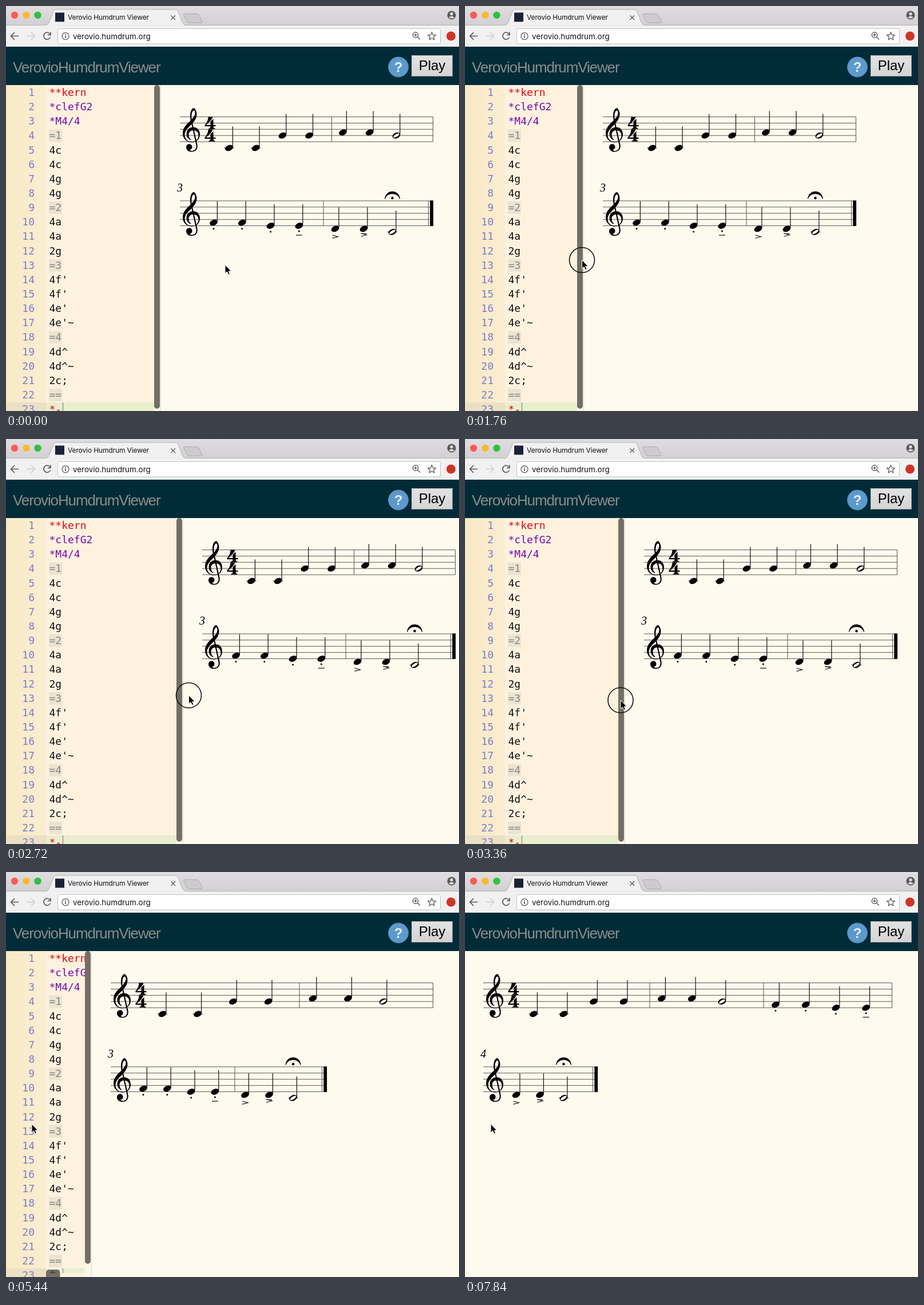
Recreate the animation shown at these times as an HTML page. Size 792 px wide and 707 px high, loop 8000 ms.

```html
<!DOCTYPE html>
<html lang="en">
<head>
<meta charset="utf-8">
<title>Verovio Humdrum Viewer</title>
<style>
  html, body { margin: 0; width: 100%; height: 100%; overflow: hidden; background: #fefaee; }
  svg { display: block; width: 792px; height: 707px; }
  text { white-space: pre; }
  .ui { font-family: Inter, "Open Sans", sans-serif; fill: #111; }
  .sans { font-family: "Liberation Sans", Arial, sans-serif; }
  .code { font: 18px "DejaVu Sans Mono", monospace; }
  .measure { font: italic 20px "Liberation Serif", "Noto Serif", serif; }
  .icon { fill: none; stroke: #5a5a5a; stroke-width: 1.7; }
</style>
</head>
<body>
<svg viewBox="0 0 792 707" xmlns="http://www.w3.org/2000/svg">
  <defs>
    <linearGradient id="titleBar" x2="0" y2="1">
      <stop stop-color="#dfdddf"/><stop offset="1" stop-color="#d2d0d2"/>
    </linearGradient>
    <linearGradient id="gutter">
      <stop stop-color="#f8e9c5"/><stop offset="1" stop-color="#fbeed2"/>
    </linearGradient>
    <linearGradient id="button" x2="0" y2="1">
      <stop stop-color="#e2e2e2"/><stop offset="1" stop-color="#d4d4d4"/>
    </linearGradient>
    <clipPath id="paneClip"><rect id="paneClipBox" y="138" height="569"/></clipPath>
    <path id="clef" d="M18.8 8C13 5.5 11.5 1 11.5-3C11.5-10 17-14.5 23.5-14.5C30.5-14.5 35-9 35-2C35 6.5 29 12 20.5 12C11.5 12 5 5.5 5-4C5-13 11-19 17.5-25C22-29.5 26.5-34 26.5-39.5C26.5-42 25.8-43.5 24.5-43.5C21.5-43.5 19.8-37 20.5-29L30.5 16C32 24 27 28.5 20.5 28.5C15 28.5 11 25 11 20.5C11 17 13.5 14.8 16.3 14.8C19.3 14.8 21.5 17 21.5 20C21.5 22.5 20 24.5 17.5 25C18.5 26.7 20.5 27 22 26.8C27 26 29.3 22 28.5 17L18.8-27C17-35 18-47 25-48C28-45 29.5-41 29.5-37C29.5-29.5 24.5-23.5 19.5-18.5C13.5-12.5 8.5-8 8.5-1C8.5 6.5 14 11 20.8 11C28.5 11 32.5 6 32.5 0C32.5-5 29-9 24-9C18.5-9 15.5-5.5 15.5-1.5C15.5 3 17 5.5 19.5 7Z"/>
    <path id="four" d="M6 0H14C12 6 6 11 2 14.3H10V8L15 3.5V14.3H19V16.5H15C15 19 16 20 18 20V21.3H7V20C9 20 10 19 10 16.5H0V14.3C4 10 6 5 6 0Z"/>
  </defs>

  <rect width="792" height="707" fill="#fefaee"/>
  <g id="score"></g>

  <g id="pane">
    <g clip-path="url(#paneClip)">
      <rect y="138" width="400" height="569" fill="#fef2df"/>
      <rect y="138" width="70" height="569" fill="url(#gutter)"/>
      <rect y="692" width="70" height="15" fill="#ece0c4"/>
      <rect x="70" y="692" width="400" height="15" fill="#e8efce"/>
      <g id="code"></g>
      <path d="M99.5 692V707" stroke="#999" stroke-width="1.6"/>
      <g id="sideScroll">
        <rect x="70" y="692" width="80" height="15" fill="#fef2df"/>
        <rect x="98" y="692" width="40" height="8" fill="#e8efce"/>
        <path d="M99.5 692V700" stroke="#999" stroke-width="1.6"/>
        <rect x="70" y="694" width="24.5" height="20" rx="5" fill="#736f66"/>
        <path d="M77 699H86M81.5 696V701" stroke="#4a3c33" stroke-width="1.6"/>
      </g>
    </g>
    <g id="divider">
      <rect y="138" width="12" height="569" fill="#fdf6e6"/>
      <path d="M11.5 138V707" stroke="#dfdbd0"/>
      <rect id="thumb" y="138" width="10" rx="5" fill="#736f66"/>
    </g>
  </g>

  <!-- browser window -->
  <rect width="792" height="34" fill="url(#titleBar)"/>
  <rect y="33.5" width="792" height="38" fill="#f2f1f2"/>
  <path d="M0 33.5H69C73 33 74 31 75.500 28L83 9.500C84 7 85 6 88 6H296C299 6 300 7 301 9.500L308 28C309.500 31 311 33.500 315 33.500H792" fill="#f2f1f2" stroke="#b3b1b3"/>
  <path d="M312 13.500H333Q336 13.500 337.500 16L343 27Q344 29.500 341 29.500H321Q318 29.500 316.500 27L311 16Q310 13.500 312 13.500Z" fill="#cdcbcd" stroke="#aeacae"/>
  <circle cx="15" cy="16" r="6.2" fill="#fc5b57"/>
  <circle cx="35.500" cy="16" r="6.2" fill="#fdb735"/>
  <circle cx="55.500" cy="16" r="6.2" fill="#2fc241"/>
  <rect x="86" y="11.500" width="16" height="16" fill="#1b2238"/>
  <text class="ui" x="108" y="24.300" font-size="12" letter-spacing="-.12">Verovio Humdrum Viewer</text>
  <path class="icon" d="M288.500 16.500L296 24M296 16.500L288.500 24" style="stroke-width:1.300"/>
  <circle cx="779" cy="16" r="7.500" fill="#58575a"/>
  <circle cx="779" cy="13.700" r="2.700" fill="#dcdadc"/>
  <path d="M774 20Q779 15 784 20Q779 23.500 774 20Z" fill="#dcdadc"/>
  <path class="icon" d="M22 52.500H9M15 46L8.700 52.500L15 59"/>
  <path class="icon" d="M37 52.500H50M44 46L50.300 52.500L44 59" style="stroke:#cfcfcf"/>
  <path class="icon" d="M77 49A6 6 0 1 0 77.500 54.500M78 45.500V50.500H73"/>
  <rect x="90.500" y="39.500" width="669" height="26.500" rx="3" fill="#fff" stroke="#c3c1c3"/>
  <circle class="icon" cx="104" cy="52.700" r="6" style="stroke-width:1.300"/>
  <path class="icon" d="M104 51.500V56M104 49V50.500"/>
  <text class="ui" x="117" y="57.500" font-size="13.400">verovio.humdrum.org</text>
  <circle class="icon" cx="716" cy="50.500" r="4.700" style="stroke-width:1.400"/>
  <path class="icon" d="M719.500 54L724 58.500M713.500 50.500H718.500M716 48V53" style="stroke-width:1.400"/>
  <path class="icon" d="M744.500 45.800L746.500 50.300L751.300 50.800L747.700 54L748.700 58.700L744.500 56.300L740.300 58.700L741.300 54L737.700 50.800L742.500 50.300Z" style="stroke-width:1.300"/>
  <circle cx="778" cy="52.500" r="8" fill="#cf3526"/>

  <!-- page header -->
  <rect y="71" width="792" height="67" fill="#022b38"/>
  <text class="sans" x="12" y="115.500" font-size="26" letter-spacing="-1.120" fill="#8b8d8b">VerovioHumdrumViewer</text>
  <circle cx="686" cy="106.500" r="17.500" fill="#5d9acb" stroke="#4a85b5"/>
  <text class="sans" x="686" y="115" font-size="24" font-weight="bold" text-anchor="middle" fill="#e3eff8">?</text>
  <rect x="709.500" y="86.500" width="71" height="36" fill="url(#button)" stroke="#b9b9b9"/>
  <path d="M710 122.500H780.500V87" fill="none" stroke="#999"/>
  <text class="sans" x="745" y="112" font-size="24" text-anchor="middle">Play</text>

  <g id="pointer">
    <circle id="ring" r="22" fill="none" stroke="#111" stroke-width="1.600"/>
    <path id="arrow" d="M0 0V15L3.500 11.800L6 17L8.500 16L6.200 11H10.700Z" stroke="#fff"/>
    <path id="beam" d="M-3.500-8Q0-8 0-5Q0-8 3.500-8M0-6V6M-3.500 8Q0 8 0 5Q0 8 3.500 8M-2 2H2" fill="none" stroke="#222" stroke-width="1.300"/>
  </g>
</svg>

<script>
const $ = id => document.getElementById(id);
const show = (id, on) => { $(id).style.display = on ? '' : 'none'; };

// ---- Humdrum source ----
const source = "**kern *clefG2 *M4/4 =1 4c 4c 4g 4g =2 4a 4a 2g =3 4f' 4f' 4e' 4e'~ =4 4d^ 4d^~ 2c; == *-".split(' ');

function codeLine(text, i) {
  const y = 157 + i * 25.14;
  const isBar = text[0] === '=';
  const isEnd = text === '*-';
  const color = isBar ? '#858585' : isEnd || text.startsWith('**') ? '#e2050f' : text[0] === '*' ? '#7508ae' : '#111';
  const mark = isBar ? `<rect x="75" y="${y - 17}" width="23" height="22" fill="#ece4d1"/>` : '';
  return `${mark}<text class="code" x="50" y="${y}" text-anchor="end" fill="#7d7dc9">${i + 1}</text>
    <text class="code" x="75.5" y="${y}" fill="${color}" ${isEnd ? 'font-weight="bold"' : ''}>${text}</text>`;
}
$('code').innerHTML = source.map(codeLine).join('');

// ---- Score engraving; y is relative to the G line ----
const SPACE = 10.87;
const steps = { a: -0.5, g: 0, f: 0.5, e: 1, d: 1.5, c: 2 };
// Capitals are half notes; the second character is the articulation.
const measures = ['c c g g', 'a a G', "f' f' e' e~", 'd> d= C;'].map(m => m.split(' '));

const line = (x1, y1, x2, y2, width = 1, color = '#111') =>
  `<path d="M${x1} ${y1}L${x2} ${y2}" stroke="${color}" stroke-width="${width}"/>`;
const barline = x => line(x, -3 * SPACE, x, SPACE, 1, '#555');
const accent = (x, y) => `<path d="M${x - 5} ${y - 2.7}L${x + 5} ${y}L${x - 5} ${y + 2.7}" fill="none" stroke="#111" stroke-width="1.1"/>`;
const dot = (x, y, r = 1.5) => `<circle cx="${x}" cy="${y}" r="${r}"/>`;

const articulations = {
  "'": (x, y) => dot(x, y + 10.5),
  '~': (x, y) => dot(x, y + 9.5) + line(x - 5.5, y + 16.5, x + 5.5, y + 16.5, 1.2),
  '>': (x, y) => accent(x, y + 13.7),
  '=': (x, y) => accent(x, y + 10.5) + line(x - 5, y + 8.5, x + 5, y + 8.5, 1.1),
  ';': x => dot(x, -37.5, 2.2) +
    `<path d="M${x - 13}-36C${x - 12}-53 ${x + 12}-53 ${x + 13}-36C${x + 9}-48 ${x - 9}-48 ${x - 13}-36Z" stroke="#000" stroke-width=".8"/>`
};

function note(code, x) {
  const pitch = code[0].toLowerCase();
  const y = steps[pitch] * SPACE;
  const half = code[0] !== pitch;
  const ellipse = (rx, ry, turn, fill) =>
    `<ellipse rx="${rx}" ry="${ry}" transform="translate(${x} ${y}) rotate(${turn})" fill="${fill}"/>`;
  return line(x + 6.4, y - 2, x + 6.4, y - 37.5, 1.2) +
    (pitch === 'c' ? line(x - 8.5, y, x + 8.5, y) : '') +
    ellipse(7.2, 4.9, -24, '#000') +
    (half ? ellipse(6, 2.3, -32, '#fefaee') : '') +
    (code[1] ? articulations[code[1]](x, y) : '');
}

// Each row entry: measure index, first note x, note spacing, closing barline x.
function system(row, index) {
  const end = row.at(-1)[3];
  let out = `<g transform="translate(0 ${226.1 + index * 146.6})">`;
  for (let i = -3; i <= 1; i++) out += line(0, i * SPACE, end, i * SPACE, 1, '#5b5953');
  out += '<use href="#clef"/>';
  out += index
    ? `<text class="measure" x="-5" y="-48.5">${row[0][0] + 1}</text>`
    : `<use href="#four" x="43.500" y="${-3 * SPACE}"/><use href="#four" x="43.500" y="${-SPACE}"/>`;
  for (const [m, start, step, close] of row) {
    measures[m].forEach((code, i) => { out += note(code, start + i * step); });
    out += m < 3 ? barline(close)
      : barline(close - 8.5) + line(close - 2.8, -3 * SPACE - .5, close - 2.8, SPACE + .5, 5.8, '#000');
  }
  return out + '</g>';
}

const layouts = [
  [[[0, 86, 46.7, 265.5], [1, 285, 46.7, 442.5]], [[2, 59, 49.8, 251], [3, 271.5, 50, 443]]],
  [[[0, 90.5, 61.7, 330], [1, 353.5, 61.5, 563.5]], [[2, 57, 41.8, 217], [3, 235, 42, 378]]],
  [[[0, 88, 52.5, 291], [1, 312, 52.7, 490], [2, 511, 52.7, 714.5]], [[3, 57.5, 41.5, 200]]]
];
$('score').innerHTML = layouts.map((rows, i) => `<g id="layout${i}">${rows.map(system).join('')}</g>`).join('');

// ---- Motion ----
const LOOP = 8000, TICK = 160, REFLOW = 4480, HIDE = 7200;

const dividerTrack = [[0, 259], [800, 259], [1440, 182], [1760, 196], [2240, 232], [2720, 298],
  [2880, 322], [3040, 315], [3360, 268], [3680, 190], [3840, 138]];
const pointerTrack = [[0, 383, 452], [640, 266, 448], [800, 264, 447], [1440, 187, 443], [1760, 204.5, 443.5],
  [2240, 245, 445], [2720, 319.5, 447.5], [2880, 335, 449], [3040, 323, 452], [3360, 272, 456],
  [3680, 193, 450], [3840, 145, 446], [4160, 132, 443], [4960, 45, 440]];
const ringTrack = [[0, 0], [640, 0], [800, 22], [4000, 22], [4160, 16.5], [4320, 0]];

function sample(track, t) {
  const next = track.findIndex(key => key[0] > t);
  if (next < 0) return track.at(-1).slice(1);
  const from = track[next - 1], to = track[next];
  const k = (t - from[0]) / (to[0] - from[0]);
  return from.slice(1).map((v, i) => v + (to[i + 1] - v) * k);
}

function render(now) {
  const t = Math.floor(now % LOOP / TICK) * TICK;
  const [bar] = sample(dividerTrack, t);
  const [x, y] = sample(pointerTrack, t);
  const [radius] = sample(ringTrack, t);
  const hidden = t >= HIDE, reflowed = t >= REFLOW;
  const layout = hidden ? 2 : reflowed ? 1 : 0;

  layouts.forEach((_, i) => show('layout' + i, i === layout));
  $('score').setAttribute('transform', `translate(${hidden ? 32 : bar + 45})`);
  show('pane', !hidden);
  show('sideScroll', reflowed);
  $('paneClipBox').setAttribute('width', bar + 1);
  $('divider').setAttribute('transform', `translate(${bar})`);
  $('thumb').setAttribute('height', reflowed ? 546 : 565);

  const inText = t >= 3920 && x > 70;
  $('pointer').setAttribute('transform', `translate(${x} ${y})`);
  show('arrow', !inText);
  show('beam', inText);
  show('ring', radius > 0);
  $('ring').setAttribute('r', radius);
}

const begin = performance.now();
function loop() {
  render(performance.now() - begin);
  requestAnimationFrame(loop);
}
loop();
</script>
</body>
</html>
```
